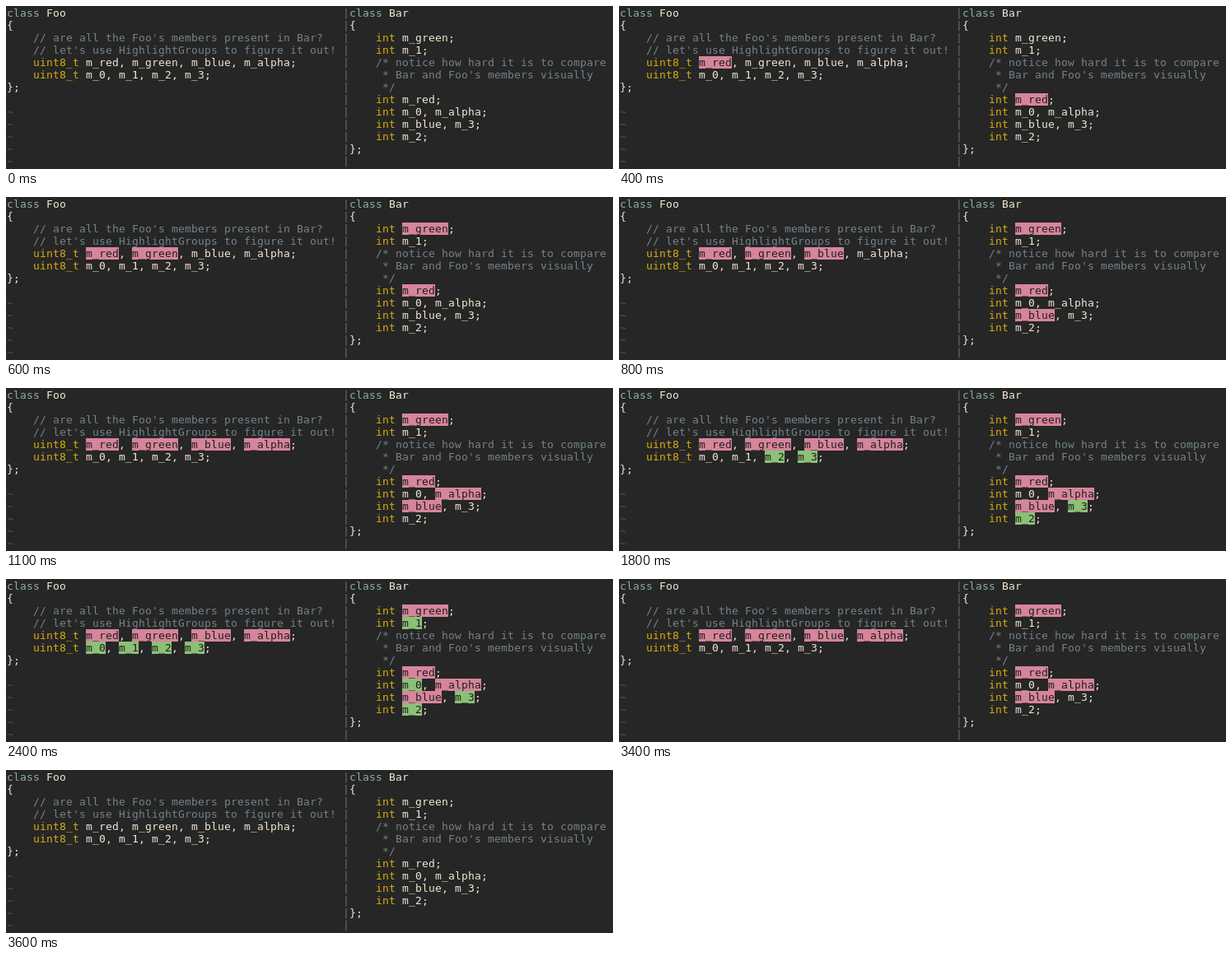
Animation of 737x198 px, one loop 3800 ms. Source, as an HTML page with a canvas:

```html
<!DOCTYPE html>
<html lang="en">
<head>
<meta charset="utf-8">
<title>Highlight groups</title>
<style>
  html, body { margin: 0; width: 100%; height: 100%; overflow: hidden; background: #262626; }
  canvas { display: block; }
</style>
</head>
<body>
<canvas id="stage" width="737" height="198"></canvas>
<script>
const ctx = document.getElementById('stage').getContext('2d', { alpha: false });

const LOOP = 3800;
const CELL = { w: 8, h: 15, left: 1, top: 1, base: 12 };
const SPLIT = 51;
const ROWS = 13;

const COLOR = {
  back: '#262626', text: '#f2e8d2', comment: '#74838a', keyword: '#8bb2a0',
  type: '#d9ae0e', tilde: '#505558', split: '#60727a',
  pink: '#d6859b', green: '#8cc077', marked: '#1e1e1e'
};

const panes = [
  { col: 0, lines: [
    'class Foo',
    '{',
    "    // are all the Foo's members present in Bar?",
    "    // let's use HighlightGroups to figure it out!",
    '    uint8_t m_red, m_green, m_blue, m_alpha;',
    '    uint8_t m_0, m_1, m_2, m_3;',
    '};', '', '~', '~', '~', '~', '~'
  ] },
  { col: SPLIT + 1, lines: [
    'class Bar',
    '{',
    '    int m_green;',
    '    int m_1;',
    '    /* notice how hard it is to compare',
    "     * Bar and Foo's members visually",
    '     */',
    '    int m_red;',
    '    int m_0, m_alpha;',
    '    int m_blue, m_3;',
    '    int m_2;',
    '};'
  ] }
];

// Each mark: group, switch-on time per pane, switch-off time.
const mark = (group, off) => (left, right = left) => ({ group, on: [left, right], off });
const pink = mark('pink', 3600);
const green = mark('green', 3400);
const marks = {
  m_red: pink(300, 400), m_green: pink(500, 600), m_blue: pink(800), m_alpha: pink(1100),
  m_3: green(1500), m_2: green(1800), m_1: green(2100), m_0: green(2400)
};

function tokenColor(token) {
  if (token === 'class') return COLOR.keyword;
  if (token === 'int' || token === 'uint8_t') return COLOR.type;
  return token === '~' ? COLOR.tilde : COLOR.text;
}

function put(text, col, row, color, fill) {
  const x = CELL.left + col * CELL.w;
  const y = CELL.top + row * CELL.h;
  if (fill) {
    ctx.fillStyle = fill;
    ctx.fillRect(x, y, text.length * CELL.w, CELL.h);
  }
  ctx.fillStyle = color;
  [...text].forEach((ch, i) => ctx.fillText(ch, x + i * CELL.w, y + CELL.base));
}

function drawLine(line, row, pane, t) {
  const { col } = panes[pane];
  if (/^\s*(\/\/|\/?\*)/.test(line)) {
    put(line, col, row, COLOR.comment);
    return;
  }
  for (const { 0: token, index } of line.matchAll(/\w+|[^\w\s]/g)) {
    const m = marks[token];
    const lit = m && t >= m.on[pane] && t < m.off;
    put(token, col + index, row, lit ? COLOR.marked : tokenColor(token), lit && COLOR[m.group]);
  }
}

function draw(t) {
  ctx.fillStyle = COLOR.back;
  ctx.fillRect(0, 0, 737, 198);
  ctx.font = '13px "DejaVu Sans Mono", monospace';
  for (let row = 0; row < ROWS; row++) put('|', SPLIT, row, COLOR.split);
  panes.forEach((pane, p) => pane.lines.forEach((line, row) => drawLine(line, row, p, t)));
}

const start = performance.now();
function frame() {
  draw((performance.now() - start) % LOOP);
  requestAnimationFrame(frame);
}
frame();
</script>
</body>
</html>
```
